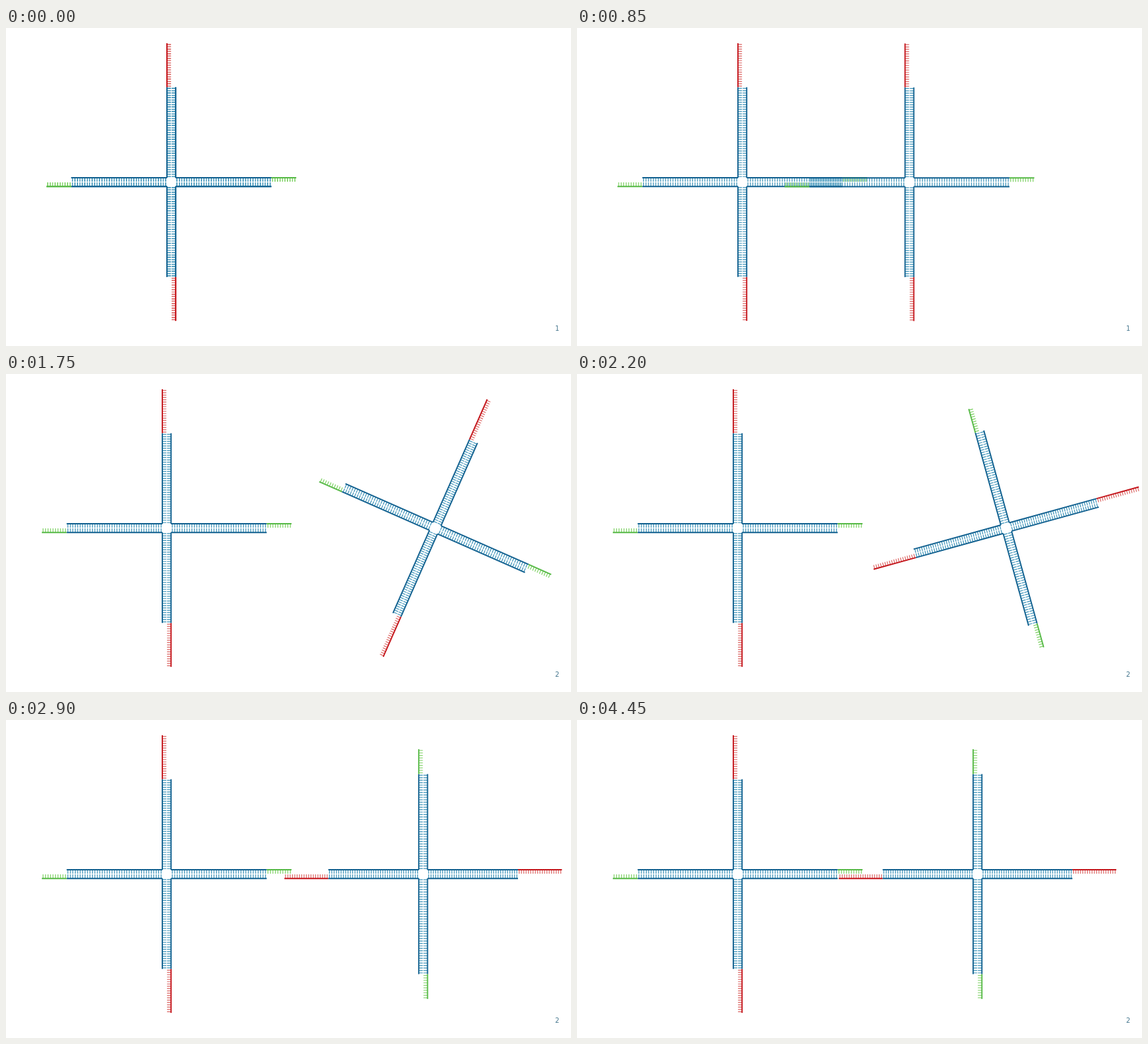
These frames come from a looping animation (853x480 px, 5600 ms). An HTML page with a canvas:

```html
<!DOCTYPE html>
<html lang="en">
<head>
<meta charset="utf-8">
<title>DNA cross tiles</title>
<style>
  html, body { margin: 0; width: 100%; height: 100%; overflow: hidden; background: #fff; }
  canvas { display: block; }
</style>
</head>
<body>
<canvas id="stage" width="853" height="480"></canvas>
<script>
const ctx = document.getElementById('stage').getContext('2d');
const LOOP = 5600, TICK = 60, LEAD = 120;
const HALF = 6.6;      // centre line to backbone
const TOOTH = 5.8;
const BLUE = { line: '#11608f', tooth: '#3a92b8' };
const RED = { line: '#c4161c', tooth: '#dc6664' };
const GREEN = { line: '#56b946', tooth: '#7bd060' };

// Progress with constant acceleration, cruise and deceleration.
function ease(tick, start, length) {
  const ramp = 0.43;
  const s = Math.min(1, Math.max(0, (tick - start) / length));
  const curve = u => u * u / (2 * ramp * (1 - ramp));
  if (s < ramp) return curve(s);
  if (s > 1 - ramp) return 1 - curve(1 - s);
  return (s - ramp / 2) / (1 - ramp);
}

function line(x1, y1, x2, y2, width, color) {
  ctx.lineWidth = width;
  ctx.strokeStyle = color;
  ctx.beginPath();
  ctx.moveTo(x1, y1);
  ctx.lineTo(x2, y2);
  ctx.stroke();
}

// A backbone with teeth on the side (nx, ny); the teeth are one wide dashed line.
function strand(x1, y1, x2, y2, nx, ny, teeth, color) {
  const pitch = Math.hypot(x2 - x1, y2 - y1) / teeth;
  const width = 1.2, shift = TOOTH / 2 + 0.3;
  ctx.setLineDash([width, pitch - width]);
  ctx.lineDashOffset = (pitch + width) / 2;
  line(x1 + nx * shift, y1 + ny * shift, x2 + nx * shift, y2 + ny * shift, TOOTH, color.tooth);
  ctx.setLineDash([]);
  line(x1, y1, x2, y2, 1.9, color.line);
}

function cross(x, y, angle) {
  const armX = 151, armY = 143.2;
  ctx.save();
  ctx.translate(x, y);
  ctx.rotate(angle);
  for (let half = 0; half < 2; half++) {
    strand(-HALF, -209.5, -HALF, -armY, 1, 0, 19, RED);
    strand(-HALF, -armY, -HALF, -HALF, 1, 0, 39, BLUE);
    strand(-armX, -HALF, -HALF, -HALF, 0, 1, 39, BLUE);
    strand(HALF, -armY, HALF, -HALF, -1, 0, 39, BLUE);
    strand(HALF, -HALF, armX, -HALF, 0, 1, 39, BLUE);
    strand(armX, -HALF, 188.5, -HALF, 0, 1, 10, GREEN);
    ctx.rotate(Math.PI);
  }
  ctx.restore();
}

function pageNumber(text) {
  ctx.font = '10px "DejaVu Sans", sans-serif';
  ctx.textAlign = 'right';
  ctx.fillStyle = '#47788f';
  ctx.fillText(text, 835.3, 457);
}

function draw(time) {
  const tick = Math.min(52, Math.floor((time - LEAD) / TICK));
  const y = 232.6;
  ctx.fillStyle = '#fff';
  ctx.fillRect(0, 0, 853, 480);
  if (tick < 20) {
    const slide = ease(tick, 0.35, 20);
    cross(249.6, y, 0);
    cross(249.6 + 391.5 * slide, y + 0.4 * slide, 0);
    pageNumber('1');
  } else {
    const turn = ease(tick, 19.8, 20);
    const dock = ease(tick, 41, 11);
    cross(242.6, y, 0);
    cross(648 - 43.3 * dock, y, turn * Math.PI / 2);
    pageNumber('2');
  }
}

const began = performance.now();
function frame() {
  draw((performance.now() - began) % LOOP);
  requestAnimationFrame(frame);
}
frame();
</script>
</body>
</html>
```
